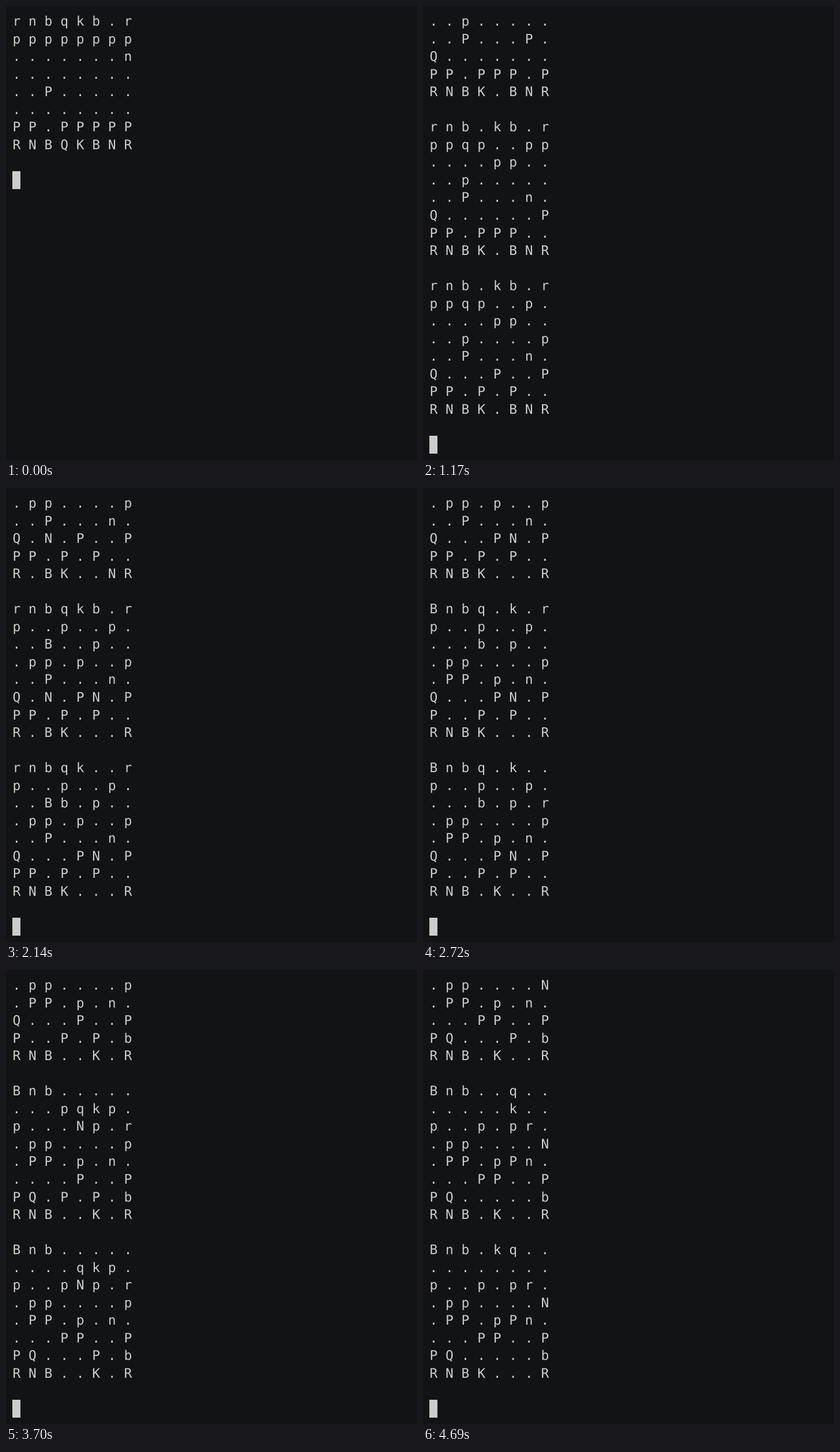
An HTML page with a canvas that plays this animation: 712 by 786 pixels, repeating every 5.69 s.

```html
<!DOCTYPE html>
<html lang="en">
<head>
<meta charset="utf-8">
<title>Terminal chess</title>
<style>
  html, body { margin: 0; width: 100%; height: 100%; overflow: hidden; background: #121314; }
  canvas { display: block; }
</style>
</head>
<body>
<canvas id="screen" width="712" height="786"></canvas>
<script>
const ctx = document.getElementById('screen').getContext('2d');
const BG = '#121314', FG = '#cccccc';
const SIZE = 22.893;
const PAD = SIZE / 2, CELL = SIZE * 0.602, LINE = SIZE * 4 / 3, ASCENT = 22.8;
const ROWS = 25;
const LOOP = 5690;
const TIMES = [0, 200, 400, 590, 790, 980, 1170, 1360, 1560, 1750, 1940, 2140, 2330,
  2530, 2720, 2920, 3120, 3310, 3510, 3700, 3900, 4100, 4300, 4490, 4690];

const START = ['rnbqkbnr', 'pppppppp', '........', '........',
  '........', '........', 'PPPPPPPP', 'RNBQKBNR'];

// One white and one black move per printed board.
const GAME = `c2c4 g8h6, d1a4 f7f6, e1d1 e7e6, g2g4 c7c5, a4a3 d8c7,
  h2h3 h6g4, e2e3 h7h5, f1g2 b7b5, b1c3 c7b6, g2c6 b6d8,
  g1f3 e6e5, c3b1 f8d6, c6a8 e8f8, b2b4 e5e4, d1e1 h8h6,
  f3g5 d6h2, e1f1 d8e7, g5e6 f8f7, a3b2 a7a6, d2d3 d7d6,
  e6g7 e7f8, f1e1 h6g6, g7h5 b8c6, f2f4 c6b8, e1d1 f7e8`;

function play(board, move) {
  const [fromFile, fromRank, toFile, toRank] = move;
  const file = c => c.charCodeAt(0) - 97;
  const from = board[8 - fromRank], to = board[8 - toRank];
  to[file(toFile)] = from[file(fromFile)];
  from[file(fromFile)] = '.';
}

function printGame() {
  const board = START.map(row => [...row]);
  const lines = [];
  for (const turn of GAME.split(',')) {
    for (const move of turn.trim().split(' ')) play(board, move);
    lines.push(...board.map(row => row.join(' ')), '');
  }
  return lines;
}

const lines = printGame();
const rowTop = row => PAD + row * LINE;

function drawLine(text, row) {
  const y = Math.round(rowTop(row) + ASCENT);
  [...text].forEach((c, i) => {
    if (c !== ' ') ctx.fillText(c, PAD + i * CELL, y);
  });
}

function drawCursor(row) {
  const x = Math.round(PAD), y = Math.round(rowTop(row));
  ctx.fillRect(x, y, Math.round(PAD + CELL) - x, Math.round(rowTop(row + 1)) - y);
}

function render(step) {
  const end = (step + 1) * 9;
  const first = Math.max(0, end + 1 - ROWS);
  ctx.fillStyle = BG;
  ctx.fillRect(0, 0, 712, 786);
  ctx.fillStyle = FG;
  ctx.font = `${SIZE}px "DejaVu Sans Mono", monospace`;
  ctx.textRendering = 'geometricPrecision';
  lines.slice(first, end).forEach(drawLine);
  drawCursor(end - first);
}

const began = performance.now();
function tick() {
  const t = (performance.now() - began) % LOOP;
  render(TIMES.filter(start => start <= t).length - 1);
  requestAnimationFrame(tick);
}
tick();
</script>
</body>
</html>
```
